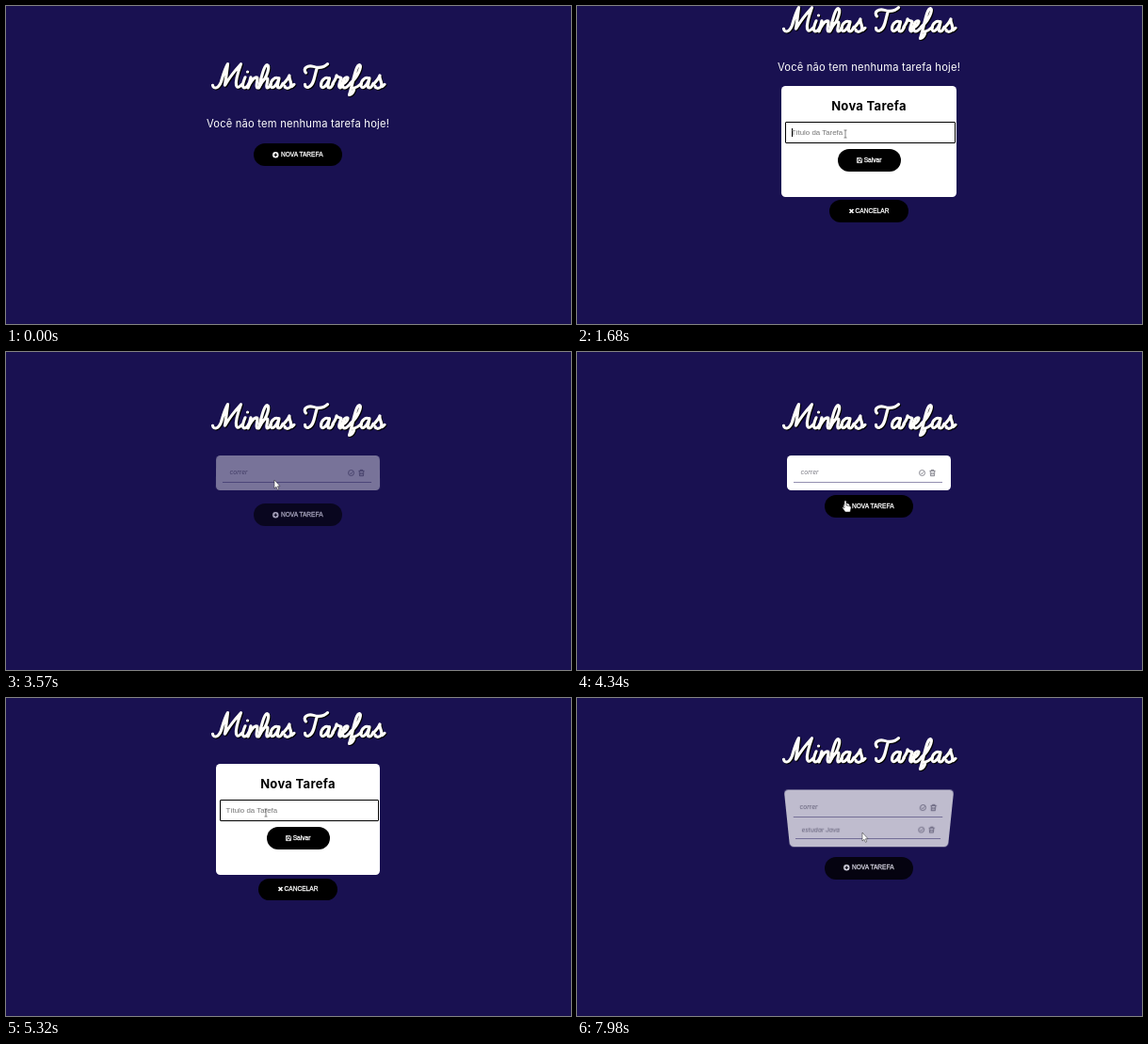
Write an HTML page that moves like this. It is 600 px wide and 338 px high and loops after 8 s.

```html
<!DOCTYPE html>
<html lang="pt-BR">
<head>
<meta charset="utf-8">
<title>Minhas Tarefas</title>
<style>
html, body { margin: 0; width: 100%; height: 100%; overflow: hidden; background: #191151; }
#stage { position: relative; width: 600px; height: 338px; overflow: hidden; background: #191151; font-family: Inter, sans-serif; }
#stage > * { position: absolute; }
svg { overflow: visible; }
#title { left: 0; width: 600px; height: 120px; fill: none; stroke: #fffefa; stroke-width: 3.2; stroke-linecap: round; stroke-linejoin: round; filter: drop-shadow(1.4px 1.7px 0 #000); }
#empty { left: 0; width: 620px; margin: 0; text-align: center; font-size: 11.2px; letter-spacing: .2px; line-height: 16px; color: #fff; }
.panel { background: #fff; border-radius: 4.5px; }
.panel > * { position: absolute; box-sizing: border-box; }
.btn { display: flex; align-items: center; justify-content: center; gap: 2px; height: 23.6px; border-radius: 12px; background: #000; color: #fff; font: 6.6px/1 Arial, "Liberation Sans", sans-serif; -webkit-text-stroke: .28px; white-space: nowrap; }
#form { height: 118px; }
#form h3 { left: 0; right: 0; top: 13px; margin: 0; text-align: center; font-size: 13px; letter-spacing: .3px; line-height: 16px; color: #000; }
#field { left: 4px; right: 1px; top: 38px; height: 23px; display: flex; align-items: center; padding-left: 5.5px; border-radius: 1px; font: 7.9px/1 Arial, "Liberation Sans", sans-serif; white-space: pre; }
#caret { width: .7px; height: 9px; margin-right: -.7px; background: #000; }
#save { left: calc(50% - 33.5px); top: 67px; width: 67px; }
#list { left: 223px; width: 174px; }
.row { left: 6.5px; width: 158.5px; height: 24.5px; border-bottom: 1px solid #938fb0; padding: 4px 0 0 8px; font: italic 6.6px/20px Inter, sans-serif; color: #74747e; }
.row svg { position: absolute; left: 133px; top: 10.5px; fill: none; stroke: #6c6c78; stroke-width: .8; }
</style>
</head>
<body>
<div id="stage">
  <svg id="title" role="img" aria-label="Minhas Tarefas"></svg>
  <p id="empty">Você não tem nenhuma tarefa hoje!</p>
  <div id="form" class="panel">
    <h3>Nova Tarefa</h3>
    <div id="field"><span id="typed"></span><i id="caret"></i></div>
    <div id="save" class="btn">
      <svg width="6" height="6" fill="none" stroke="#fff" stroke-width=".8"><path d="M.4 .4H4.6L5.6 1.4V5.6H.4ZM1.5 .4V2.2H4V.4M1.5 5.6V3.6H4.5V5.6"/></svg>Salvar
    </div>
  </div>
  <div id="list" class="panel"></div>
  <div id="main" class="btn"></div>
  <svg id="cursor" width="1" height="1"><path/></svg>
</div>
<script>
const $ = id => document.getElementById(id);
const LOOP = 8000, ANIM = 610, BLINK = 305;

// Script lettering: one pen stroke per letter, baseline at y = 0
const glyphs = {
  M: 'M0-3C1 2 6 1 9-7C11-14 13-22 16-27C15-18 14-10 13-3C18-12 24-20 30-27C27-18 24-8 25-3C26 1 29-1 31-4',
  i: 'M4-12C2-7 0-1 3 0C5 0 7-3 8-5M6.5-18h.1',
  n: 'M2-12C1-8 0-4-1 0C1-6 5-12 8-12C11-12 6-1 9 0C11 0 12-3 13-5',
  h: 'M2-6C8-12 11-25 8-26C5-27 1-10-1 0C1-6 5-11 7-11C11-11 5-1 8 0C10 0 11-3 12-5',
  a: 'M9-10C6-14 0-9 0-3C0 2 6 0 9-11C8-5 6 0 9 0C11 0 12-3 13-5',
  s: 'M0-4C4-8 6-11 7-14C6-9 11-5 8-1C6 1 2 1 2-2M8-1C10-1 11-3 12-4',
  T: 'M3-17C-1-22 5-26 11-24C17-22 22-23 26-27M15-23C12-15 12-3 6-1C4 0 2-1 2-4',
  r: 'M0-5C2-8 4-12 4-14C5-11 8-13 9-11C8-7 5-1 8 0C9 0 9-3 10-5',
  e: 'M0-4C5-5 9-12 6-12C2-12-1 0 4 0C6 0 8-3 10-5',
  f: 'M0-5C8-12 13-25 10-26C6-27 3-5-1 8C2 8 5 2 4 0C7 0 10-3 12-5'
};
const letterX = [219.5, 250, 258, 269.5, 281, 294, 315.5, 334.5, 347, 356, 365.5, 377, 390];
$('title').innerHTML = [...'MinhasTarefas'].map((c, i) =>
  `<path transform="translate(${letterX[i]} 87) scale(1 .94)" d="${glyphs[c]}"/>`).join('');

const labels = {
  nova: '<svg width="6.6" height="6.6" viewBox="0 0 7 7"><circle cx="3.5" cy="3.5" r="3.4" fill="#fff"/><path d="M1.6 3.5H5.4M3.5 1.6V5.4" stroke="#000" stroke-width="1.2"/></svg>NOVA TAREFA',
  cancel: '<svg width="5" height="6"><path d="M.5 1L4.5 5M4.5 1L.5 5" stroke="#fff" stroke-width="1.6"/></svg>CANCELAR'
};
$('list').innerHTML = ['correr', 'estudar Java'].map((name, i) =>
  `<div class="row" style="top:${4.4 + i * 24.5}px">${name}<svg width="18" height="7"><circle cx="3.5" cy="3.5" r="3"/><path d="M2 3.5L3.2 4.7L5.2 2.4M11.5 1.4H17.5M13.3 1.2V.3H15.7V1.2M12.2 1.6L12.5 6.7H16.5L16.8 1.6M13.8 3V5.5M15.2 3V5.5"/></svg></div>`).join('');

// Screens: start time, title shift, main button top, then the panel shown
const screens = [
  { at: -ANIM, shift: 0, btn: 146 },
  { at: 870, shift: -60, btn: 206, form: 85, width: 186, word: 'correr', focus: 1560,
    keys: [2450, 2660, 2800, 2870, 3010, 3150] },
  { at: 3356, shift: -6, btn: 152, list: 110.3, rows: 1 },
  { at: 4416, shift: -46, btn: 191.7, form: 70, width: 174, word: 'estudar Java', focus: 5015,
    keys: [5460, 5600, 5740, 5880, 5950, 6020, 6160, 6230, 6650, 6720, 6860, 6905] },
  { at: 7681, shift: -19, btn: 164, list: 98, rows: 2 }
];

const track = [[70, 129, 160], [770, 315, 150], [1250, 315, 150], [1530, 285, 136], [4130, 285, 136],
  [4340, 285, 158], [4480, 285, 158], [4680, 285, 147], [4760, 285, 147], [4990, 276, 122],
  [7350, 276, 122], [7620, 303, 143], [LOOP, 303, 143]];
const shapes = {
  arrow: ['M0 0V9L2 7.2L3.4 10.3L4.7 9.7L3.4 6.7H6Z', '#fff', '#222', .5],
  hand: ['M-1 1C-1-.5 1-.5 1 1V5L5 6C6 6.3 6 7 6 8L5 12H0L-3 8C-3.5 7-2.3 6.5-1 8Z', '#fff', '#222', .5],
  beam: ['M-1.5-4H1.5M0-4V4M-1.5 4H1.5', 'none', '#555', .7]
};

function bezier(x1, y1, x2, y2) {
  const at = (a, b, s) => 3 * (1 - s) ** 2 * s * a + 3 * (1 - s) * s * s * b + s ** 3;
  return x => {
    let lo = 0, hi = 1;
    for (let i = 0; i < 24; i++) {
      const mid = (lo + hi) / 2;
      if (at(x1, x2, mid) < x) lo = mid; else hi = mid;
    }
    return at(y1, y2, lo);
  };
}
const ease = bezier(.25, .1, .25, 1), easeIn = bezier(.42, 0, 1, 1);

const swing = [[0, 90], [.4, -20], [.6, 10], [.8, -5], [1, 0]];
function flip(el, p) {
  const i = Math.max(1, swing.findIndex(k => k[0] >= p));
  const [p0, a0] = swing[i - 1], [p1, a1] = swing[i];
  const angle = a0 + (a1 - a0) * (i < 3 ? easeIn : ease)((p - p0) / (p1 - p0));
  el.style.transform = `perspective(176px) rotateX(${angle}deg)`;
  el.style.opacity = p < .6 ? easeIn(p / .6) : 1;
}

const place = (el, box) => { for (const k in box) el.style[k] = box[k] + 'px'; };
const show = (el, on) => { el.style.display = on ? '' : 'none'; };

function drawForm(s, t) {
  const focused = t >= s.focus, count = s.keys.filter(k => k <= t).length;
  const last = count ? s.keys[count - 1] : s.focus;
  place($('form'), { top: s.form, left: 310 - s.width / 2, width: s.width });
  $('typed').textContent = count ? s.word.slice(0, count) : 'Título da Tarefa';
  $('typed').style.color = count ? '#555' : '#757575';
  $('field').style.border = focused ? '1.3px solid #000' : '1px solid #767676';
  // the caret sits before the placeholder and after typed text
  $('caret').style.order = count ? 1 : -1;
  $('caret').style.visibility = focused && (t - last) % (2 * BLINK) < BLINK ? 'visible' : 'hidden';
}

function drawCursor(s, t) {
  const i = track.findIndex(k => k[0] > t);
  show($('cursor'), i > 0);
  if (i < 1) return;
  const [t0, x0, y0] = track[i - 1], [t1, x1, y1] = track[i];
  const u = (t - t0) / (t1 - t0), e = u * u * (3 - 2 * u);
  const x = x0 + (x1 - x0) * e, y = y0 + (y1 - y0) * e;
  const over = (left, right, top, h) => x > left && x < right && y > top && y < top + h;
  let kind = over(268, 352, s.btn, 24) ? 'hand' : 'arrow';
  if (s.form) {
    if (over(276, 344, s.form + 67, 24)) kind = 'hand';
    if (over(225, 396, s.form + 38, 23)) kind = 'beam';
    if (t < s.focus - 250) kind = 'hand';
  }
  const [d, fill, stroke, width] = shapes[kind], path = $('cursor').firstChild;
  path.setAttribute('d', d);
  path.setAttribute('fill', fill);
  path.setAttribute('stroke', stroke);
  path.setAttribute('stroke-width', width);
  place($('cursor'), { left: x, top: y });
}

let current;
function draw(t) {
  const s = screens.findLast(k => k.at <= t);
  const p = Math.min(1, (t - s.at) / ANIM), rise = ease(p), main = $('main');
  if (s !== current) {
    current = s;
    main.innerHTML = s.form ? labels.cancel : labels.nova;
    show($('form'), s.form);
    show($('list'), s.list);
    show($('empty'), s.at < 1000);
    [...$('list').children].forEach((row, i) => show(row, i < s.rows));
  }
  place($('title'), { top: s.shift });
  place($('empty'), { top: 117 + s.shift });
  place(main, { left: s.form ? 268 : 263.2, width: s.form ? 84 : 93.5, top: s.btn + (1 - rise) * 24 });
  main.style.opacity = rise;
  if (s.form) {
    drawForm(s, t);
    flip($('form'), p);
  } else if (s.list) {
    place($('list'), { top: s.list, height: 12.7 + 24.5 * s.rows });
    flip($('list'), p);
  }
  drawCursor(s, t);
}

const start = performance.now();
function tick() {
  draw((performance.now() - start) % LOOP);
  requestAnimationFrame(tick);
}
tick();
</script>
</body>
</html>
```
